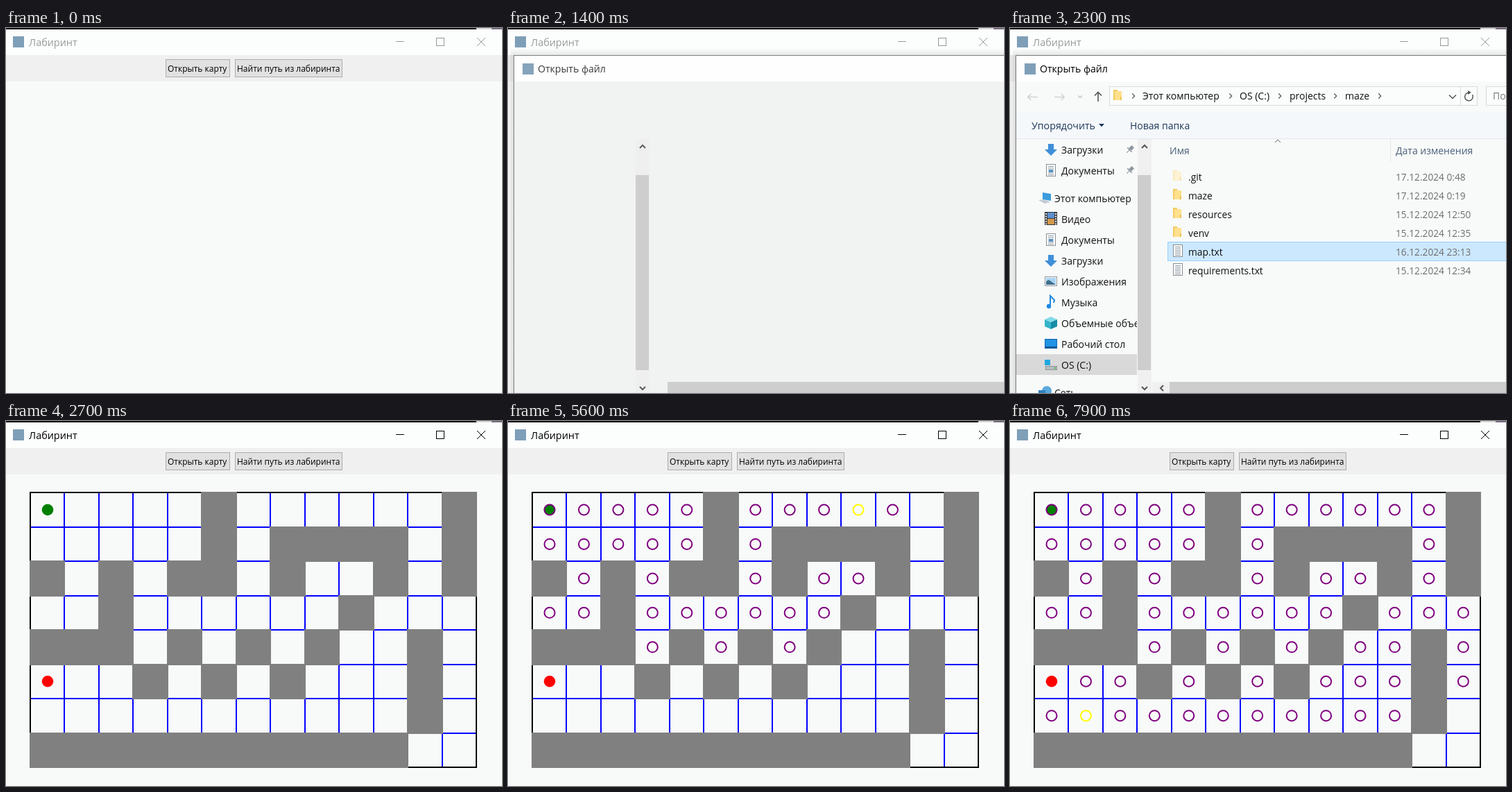
Recreate the animation shown at these times as an HTML page with a canvas. Size 715 by 526 pixels, loop 8 s.

```html
<!DOCTYPE html>
<html lang="ru">
<head>
<meta charset="utf-8">
<title>Лабиринт</title>
<style>
html, body { margin: 0; width: 100%; height: 100%; overflow: hidden; background: #f8faf9; }
canvas { display: block; }
</style>
</head>
<body>
<canvas id="stage" width="715" height="526"></canvas>
<script>
const W = 715, H = 526, LOOP = 8000;
const ctx = document.getElementById('stage').getContext('2d');
const UI = '"Open Sans", "Noto Sans", sans-serif';

// ---------- drawing helpers ----------
function box(x, y, w, h, fill) {
  ctx.fillStyle = fill;
  ctx.fillRect(x, y, w, h);
}
function frame(x, y, w, h, fill, edge) {
  box(x, y, w, h, edge);
  box(x + 1, y + 1, w - 2, h - 2, fill);
}
function text(str, x, y, size = 14, color = '#000') {
  ctx.font = size + 'px ' + UI;
  ctx.fillStyle = color;
  ctx.fillText(str, x, y);
}
function path(points, color, width = 1) {
  ctx.beginPath();
  points.forEach(([x, y]) => ctx.lineTo(x, y));
  ctx.strokeStyle = color;
  ctx.lineWidth = width;
  ctx.stroke();
}
function poly(points, color) {
  ctx.beginPath();
  points.forEach(([x, y]) => ctx.lineTo(x, y));
  ctx.fillStyle = color;
  ctx.fill();
}
function disc(x, y, r, color) {
  ctx.beginPath();
  ctx.arc(x, y, r, 0, 7);
  ctx.fillStyle = color;
  ctx.fill();
}
function ring(x, y, r, color) {
  ctx.beginPath();
  ctx.arc(x, y, r, 0, 7);
  ctx.strokeStyle = color;
  ctx.lineWidth = 2;
  ctx.stroke();
}
// Chevron centred on x, y, pointing along dx, dy
function chevron(x, y, dx, dy, size, color, width = 1.2) {
  const a = size * dx, b = size * dy;
  path([[x - a / 2 - b, y - b / 2 - a], [x + a / 2, y + b / 2], [x - a / 2 + b, y - b / 2 + a]], color, width);
}
function mix(a, b, k) {
  return 'rgb(' + a.map((v, i) => Math.round(v + (b[i] - v) * k)) + ')';
}
// Value of a piecewise linear track [[time, value], ...]
function track(keys, t) {
  if (t <= keys[0][0]) return keys[0][1];
  for (let i = 1; i < keys.length; i++) {
    const [t0, v0] = keys[i - 1], [t1, v1] = keys[i];
    if (t < t1) return v0 + (v1 - v0) * (t - t0) / (t1 - t0);
  }
  return keys[keys.length - 1][1];
}

// ---------- maze and A* search ----------
const MAP = [
  '.....#......#',
  '.....#.####.#',
  '#.#.##.#..#.#',
  '..#......#...',
  '###.#.#.#..#.',
  '...#.#.#...#.',
  '...........#.',
  '###########..'
];
const ROWS = 8, COLS = 13, GOAL = [5, 0];
const gx = c => Math.round(35 + c * 643 / COLS);
const gy = r => Math.round(103 + r * 396 / ROWS);
const cx = c => 60 + c * 49.45;
const cy = r => 128 + r * 49.45;

function search() {
  const start = { r: 0, c: 0, g: 0, f: 0, born: 0 };
  const seen = [start], open = [start], order = [];
  while (open.length) {
    const cur = open.reduce((best, n) => n.f < best.f ? n : best);
    open.splice(open.indexOf(cur), 1);
    order.push(cur);
    if (cur.r === GOAL[0] && cur.c === GOAL[1]) break;
    for (const [dr, dc] of [[-1, 0], [1, 0], [0, -1], [0, 1]]) {
      const r = cur.r + dr, c = cur.c + dc;
      if (!MAP[r] || MAP[r][c] !== '.' || seen.some(n => n.r === r && n.c === c)) continue;
      const g = cur.g + 1;
      const node = { r, c, g, f: g + Math.hypot(r - GOAL[0], c - GOAL[1]), born: order.length };
      seen.push(node);
      open.push(node);
    }
  }
  return { seen, order };
}
const { seen, order } = search();
const PACE = [[4400, 0], [5100, 21], [5600, 31], [6000, 39], [6600, 47], [7600, 52], [7700, 53], [7900, 54], [8100, 55]];

function drawMaze(t) {
  for (let c = 1; c < COLS; c++) box(gx(c) - 1, 102, 2, 398, '#00f');
  for (let r = 1; r < ROWS; r++) box(34, gy(r) - 1, 645, 2, '#00f');
  ctx.strokeStyle = '#000';
  ctx.lineWidth = 2;
  ctx.strokeRect(35, 103, 643, 396);
  for (let r = 0; r < ROWS; r++)
    for (let c = 0; c < COLS; c++)
      if (MAP[r][c] === '#')
        box(gx(c) - 1, gy(r) - 1, gx(c + 1) - gx(c) + 2, gy(r + 1) - gy(r) + 2, '#808080');
  disc(cx(0), cy(0), 8.3, '#008000');
  disc(cx(GOAL[1]), cy(GOAL[0]), 8.3, '#f00');

  const step = Math.floor(track(PACE, t) + 1e-6);
  if (step < 1) return;
  const cur = order[step - 1];
  for (const n of seen)
    if (n.born <= step) ring(cx(n.c), cy(n.r), 7.5, n === cur ? '#ff0' : '#800080');
}

// ---------- main window ----------
// State: 0 idle, 1 hover, 2 pressed
function button(x, w, label, state) {
  const fills = [[225, 225, 225], [229, 241, 251], [204, 228, 247], [204, 228, 247]];
  const edges = [[173, 173, 173], [0, 120, 215], [0, 84, 153], [0, 84, 153]];
  const i = Math.floor(state), k = state - i;
  frame(x, 45, w, 26, mix(fills[i], fills[i + 1], k), mix(edges[i], edges[i + 1], k));
  text(label, x + 3, 63, 12);
}
const OPEN_BUTTON = [[100, 0], [300, 1], [400, 2], [500, 1], [2400, 1], [2500, 0]];
const FIND_BUTTON = [[3300, 0], [3500, 1], [4200, 1], [4300, 1.5], [4400, 2], [4500, 1], [4800, 1], [5000, 0]];

function drawWindow(t) {
  const active = (t >= 200 && t < 700) || t >= 2500;
  const ink = active ? '#000' : '#999';
  box(0, 0, W, H, '#f8faf9');
  box(0, 2, W, 37, '#fcfdfd');
  box(0, 0, W, 2, '#080808');
  box(678, 0, 22, 2, '#d8d8d8');
  box(700, 0, 15, 2, '#786c80');
  box(10, 12, 16, 16, '#7f9fb8');
  text('Лабиринт', 33, 25.5, 14.4, ink);
  box(562, 19, 12, 1, ink);
  ctx.strokeStyle = ink;
  ctx.lineWidth = 1;
  ctx.strokeRect(620.5, 14.5, 11, 11);
  path([[679, 14], [691, 26]], ink);
  path([[691, 14], [679, 26]], ink);
  box(0, 39, W, 38, '#f0f0f0');
  button(230, 93, 'Открыть карту', track(OPEN_BUTTON, t));
  button(330, 155, 'Найти путь из лабиринта', track(FIND_BUTTON, t));
}

// ---------- file dialog ----------
function folder(x, y, pale) {
  box(x, y - 8, 6, 15, pale ? '#fbeab8' : '#f3cb60');
  box(x + 2, y - 6, 10, 13, pale ? '#fdf2d2' : '#ffe08d');
  box(x + 10, y + 2, 2, 5, pale ? '#f7e3ae' : '#eec259');
}
function sheet(x, y) {
  frame(x, y - 9, 14, 18, '#fff', '#8a8f94');
  for (let i = 0; i < 6; i++) box(x + 3, y - 6 + i * 2.4, 8, 1, '#8d9aa5');
}
const ICONS = {
  down(x, y) {
    poly([[x - 4, y - 8], [x + 4, y - 8], [x + 4, y], [x + 9, y], [x, y + 9], [x - 9, y], [x - 4, y]], '#3f8fd9');
  },
  doc(x, y) {
    sheet(x - 7, y);
    box(x - 3, y - 1, 6, 4, '#5b95c4');
  },
  pc(x, y) {
    poly([[x - 3, y - 8], [x + 9, y - 6], [x + 9, y + 4], [x - 3, y + 2]], '#3b9bdc');
    poly([[x - 9, y + 3], [x - 1, y + 2], [x + 8, y + 6], [x, y + 8]], '#c3ccd4');
  },
  film(x, y) {
    box(x - 9, y - 10, 18, 19, '#34383c');
    box(x - 5, y - 9, 10, 8, '#5f8fd0');
    box(x - 5, y, 10, 8, '#d39a4c');
    for (let i = 0; i < 5; i++) {
      box(x - 8, y - 8 + i * 3.6, 2, 2, '#eee');
      box(x + 6, y - 8 + i * 3.6, 2, 2, '#eee');
    }
  },
  image(x, y) {
    frame(x - 9, y - 7, 18, 14, '#fff', '#8b949b');
    box(x - 7, y - 5, 14, 10, '#a9d4f5');
    poly([[x - 7, y + 5], [x - 7, y], [x - 3, y - 2], [x + 7, y + 5]], '#3f6f8c');
  },
  note(x, y) {
    path([[x - 1, y + 6], [x - 1, y - 9], [x + 5, y - 3], [x + 4, y + 1]], '#1e88e0', 2);
    disc(x - 3, y + 6, 3.2, '#1e88e0');
  },
  cube(x, y) {
    poly([[x, y - 9], [x + 9, y - 5], [x, y - 1], [x - 9, y - 5]], '#84dbe8');
    poly([[x - 9, y - 5], [x, y - 1], [x, y + 9], [x - 9, y + 5]], '#35b4cb');
    poly([[x + 9, y - 5], [x, y - 1], [x, y + 9], [x + 9, y + 5]], '#168ca5');
  },
  desk(x, y) {
    frame(x - 9, y - 7, 18, 14, '#1f93e4', '#1366ad');
    box(x - 8, y + 4, 16, 2, '#0c568f');
  },
  drive(x, y) {
    frame(x - 8, y + 2, 17, 6, '#b8bec3', '#8d9499');
    box(x - 9, y - 7, 8, 8, '#21a8e0');
    box(x + 5, y + 4, 2, 2, '#3bbf4e');
  },
  net(x, y) {
    disc(x + 3, y - 2, 7, '#5aa9dc');
    box(x - 9, y - 3, 10, 8, '#2d7fc0');
  }
};
const PLACES = [
  ['Загрузки', 'down', 176], ['Документы', 'doc', 206], ['Этот компьютер', 'pc', 246, 9],
  ['Видео', 'film', 276], ['Документы', 'doc', 306], ['Загрузки', 'down', 336],
  ['Изображения', 'image', 366], ['Музыка', 'note', 396], ['Объемные объекты', 'cube', 426],
  ['Рабочий стол', 'desk', 456], ['OS (C:)', 'drive', 486], ['Сеть', 'net', 526, 9]
];
const FILES = [
  ['.git', '17.12.2024 0:48'], ['maze', '17.12.2024 0:19'], ['resources', '15.12.2024 12:50'],
  ['venv', '15.12.2024 12:35'], ['map.txt', '16.12.2024 23:13'], ['requirements.txt', '15.12.2024 12:34']
];

function pin(x, y) {
  ctx.save();
  ctx.translate(x, y);
  ctx.rotate(Math.PI / 4);
  box(-2.5, -6, 5, 6, '#8e979f');
  box(-4.5, 0, 9, 1.5, '#8e979f');
  box(-0.5, 1, 1, 6, '#8e979f');
  ctx.restore();
}

function drawAddress() {
  for (const [x, d] of [[33, -1], [71, 1]]) {
    path([[x - 7, 99.5], [x + 7, 99.5]], '#ccc', 1.3);
    chevron(x + d * 5, 99.5, d, 0, 4.5, '#ccc', 1.3);
  }
  chevron(101, 99, 0, 1, 3, '#bbb');
  path([[127, 93], [127, 106]], '#555', 1.6);
  chevron(127, 95, 0, -1, 5, '#555', 1.6);
  frame(143, 84, 531, 28, '#fbfcfc', '#d9d9d9');
  box(649, 85, 1, 26, '#d9d9d9');
  folder(149, 97);
  for (const x of [178, 318, 389, 469, 533]) chevron(x, 98, 1, 0, 3.5, '#555');
  [['Этот компьютер', 191], ['OS (C:)', 331], ['projects', 403], ['maze', 483]]
    .forEach(([s, x]) => text(s, x, 103, 14, '#111'));
  chevron(638, 99, 0, 1, 5, '#555', 1.5);
  ctx.beginPath();
  ctx.arc(661.5, 99, 5.8, -0.5, 4.6);
  ctx.strokeStyle = '#555';
  ctx.lineWidth = 1.5;
  ctx.stroke();
  poly([[660, 90], [660, 96], [665, 93]], '#555');
  frame(686, 84, 40, 28, '#fbfcfc', '#d9d9d9');
  text('По', 696, 103, 14, '#777');

  box(9, 122, W, 37, '#f5f8fb');
  box(9, 159, W, 1, '#e4e8ec');
  text('Упорядочить', 31, 146, 14.2, '#1e395b');
  poly([[128, 138], [136, 138], [132, 142.5]], '#1e395b');
  text('Новая папка', 173, 146, 14, '#1e395b');
}

function drawPlaces() {
  ctx.save();
  ctx.beginPath();
  ctx.rect(9, 160, 174, H);
  ctx.clip();
  box(9, 470, 174, 30, '#d9d9d9');
  for (const [name, icon, y, shift = 0] of PLACES) {
    ICONS[icon](59 - shift, y - 1);
    text(name, shift ? 64 : 74, y + 5, 14, '#111');
  }
  pin(173, 175);
  pin(173, 205);
  ctx.restore();
}

function drawFiles(t) {
  chevron(386, 163, 0, -1, 4, '#666', 1);
  text('Имя', 230, 182, 14, '#4c607a');
  box(548, 160, 1, 32, '#e2e5e8');
  text('Дата изменения', 556, 182, 14, '#4c607a');
  const hot = t >= 2100 ? 4 : t >= 1800 ? 3 : -1;
  FILES.forEach(([name, date], i) => {
    const y = 214 + i * 27;
    if (i === hot) {
      if (t >= 2300) frame(227, y - 14, 500, 28, '#cce8ff', '#99d1ff');
      else box(227, y - 14, 500, 28, '#e5f3ff');
    }
    if (i < 4) folder(235, y - 1, i === 0);
    else sheet(235, y - 1);
    text(name, 257, y + 6, 13.8, '#111');
    text(date, 556, y + 6, 13.7, '#6d6d6d');
  });
}

function drawShadow() {
  const left = ctx.createLinearGradient(0, 0, 9, 0);
  left.addColorStop(0, 'rgba(0,0,0,0.02)');
  left.addColorStop(1, 'rgba(0,0,0,0.13)');
  box(0, 39, 9, H, left);
  const top = ctx.createLinearGradient(0, 29, 0, 39);
  top.addColorStop(0, 'rgba(0,0,0,0)');
  top.addColorStop(1, 'rgba(0,0,0,0.09)');
  box(4, 29, W, 10, top);
}

const DIALOG_ALPHA = [[1100, 0], [1200, 0.35], [1300, 0.75], [1400, 0.95], [1500, 1], [2400, 1], [2500, 0.6], [2600, 0.15], [2700, 0]];

function drawDialog(t) {
  const alpha = track(DIALOG_ALPHA, t);
  if (!alpha) return;
  ctx.save();
  ctx.globalAlpha = alpha;
  drawShadow();
  box(8, 39, W, H, '#777');
  box(9, 40, W, H, '#f8faf9');
  box(9, 40, W, 37, '#fff');
  box(21, 51, 16, 16, '#7f9fb8');
  text('Открыть файл', 43, 64, 14.1, t < 1500 ? '#333' : '#000');
  if (t >= 1500) drawAddress();
  if (t >= 1600) drawPlaces();
  if (t >= 1700) drawFiles(t);
  box(184, 160, 20, H, '#f0f0f0');
  box(184, 212, 19, 281, '#cdcdcd');
  chevron(194, 171, 0, -1, 4, '#555', 2);
  chevron(194, 519, 0, 1, 4, '#555', 2);
  if (t >= 1500) {
    box(205, 510, 26, 16, '#f0f0f0');
    chevron(219, 519, -1, 0, 4, '#555', 2);
  }
  box(230, 510, W, 16, '#cdcdcd');
  ctx.restore();
}

// ---------- loop ----------
function render(now) {
  const t = Math.floor((now % LOOP) / 100) * 100;
  drawWindow(t);
  if (t >= 2600) drawMaze(t);
  drawDialog(t);
  requestAnimationFrame(() => render(performance.now() - begin));
}
const begin = performance.now();
render(0);
</script>
</body>
</html>
```
